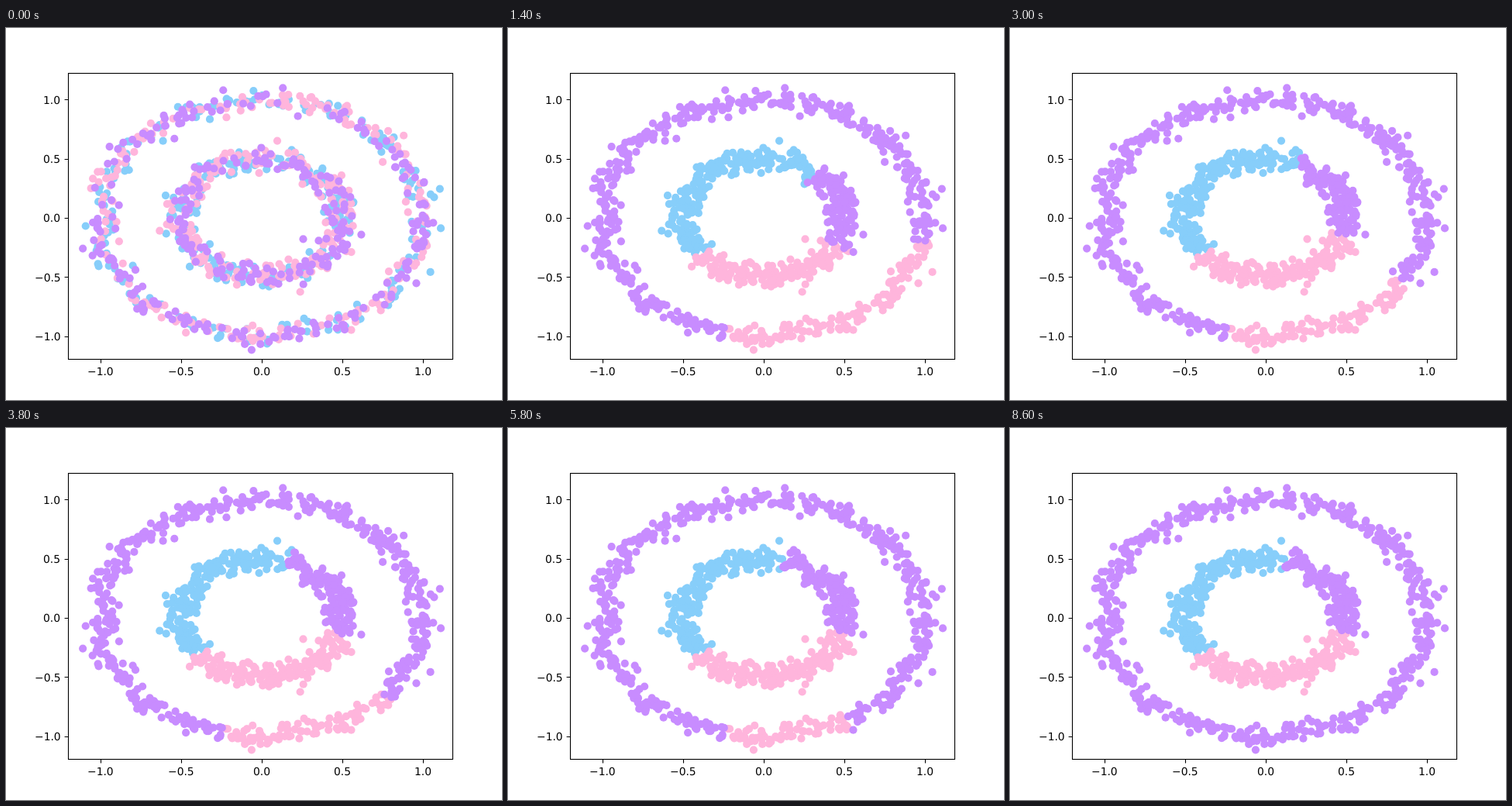
Write an HTML page with a canvas that moves like this. It is 640 px wide and 480 px high and loops after 8.8 s.

```html
<!DOCTYPE html>
<html lang="en">
<head>
<meta charset="utf-8">
<title>Clustering two rings</title>
<style>
html, body { margin: 0; width: 100%; height: 100%; overflow: hidden; background: #fff; }
canvas { display: block; }
</style>
</head>
<body>
<canvas id="plot" width="640" height="480"></canvas>
<script>
const ctx = document.getElementById('plot').getContext('2d');
const LOOP = 8800, STEP = 200;
const COLORS = ['#87cefa', '#ffb5dc', '#c88cff'];
const BLUE = 0, PINK = 1, PURPLE = 2;
const px = x => 330 + 208 * x;
const py = y => 245 - 152.7 * y;

let seed = 20;
function rand() {
  seed = (seed * 1664525 + 1013904223) % 4294967296;
  return seed / 4294967296;
}
function gauss() {
  return Math.sqrt(-2 * Math.log(1 - rand())) * Math.cos(2 * Math.PI * rand());
}

// Two noisy rings; each point starts in a random cluster
function ring(radius, count) {
  return Array.from({ length: count }, (_, i) => {
    const a = 2 * Math.PI * i / count;
    const x = radius * Math.cos(a) + 0.05 * gauss();
    const y = radius * Math.sin(a) + 0.05 * gauss();
    return { x: px(x), y: py(y), r: Math.hypot(x, y), inner: radius < 1,
      angle: Math.atan2(y, x) * 180 / Math.PI, first: Math.floor(rand() * 3) };
  });
}
const points = [...ring(1, 550), ...ring(0.5, 550)];

// Cluster borders in degrees, s seconds after the clusters have formed
function bordersAt(s) {
  const settle = (end, shift, time) => end + shift * Math.exp(-s / time);
  const collapse = Math.max(0, (s - 6.4) / 1.4);
  return {
    innerTop: settle(76, -48, 1.45),
    innerRight: settle(-14, -31, 1),
    innerLeft: settle(-143, 15, 0.3),
    outerRight: -14.5 * s + 0.58 * s * s - 28 * collapse ** 2,
    outerLeft: settle(-104, 6, 0.3),
    patch: Math.max(0, 1 - s / 0.6)
  };
}

function cluster(p, t, b) {
  if (t === 0) return p.first;
  const wobble = Math.max(0, 600 - t) / 16;
  const a = p.angle + wobble * Math.sin(p.angle * Math.PI / 30 + p.r * 4);
  if (p.inner) {
    if (a > b.innerLeft && a < b.innerRight) return PINK;
    return a >= b.innerRight && a < b.innerTop ? PURPLE : BLUE;
  }
  if (a > b.outerLeft && a < b.outerRight) return PINK;
  // Early patches that shrink away
  if (a < -180 + 28 * b.patch) return PINK;
  if (Math.abs(a - 44) < 6 * b.patch && p.r < 1.03) return BLUE;
  if (a > 48 && a < 48 + 34 * b.patch && p.r < 0.84 + 0.09 * b.patch) return BLUE;
  return PURPLE;
}

function drawAxes() {
  ctx.strokeStyle = ctx.fillStyle = '#000';
  ctx.lineWidth = 1.11;
  ctx.strokeRect(80.5, 58.5, 496, 369);
  ctx.font = '13.89px "DejaVu Sans", sans-serif';
  ctx.textRendering = 'geometricPrecision';
  ctx.beginPath();
  for (let v = -1; v <= 1; v += 0.5) {
    const x = Math.round(px(v)) + 0.5, y = Math.round(py(v)) + 0.5;
    const label = v.toFixed(1).replace('-', '\u2212');
    const width = ctx.measureText(label).width;
    ctx.moveTo(x, 427.5);
    ctx.lineTo(x, 432.4);
    ctx.moveTo(80.5, y);
    ctx.lineTo(75.6, y);
    ctx.fillText(label, Math.round(px(v) - width / 2), 448);
    ctx.fillText(label, Math.round(70.3 - width), Math.round(py(v) + 5.2));
  }
  ctx.stroke();
}

function draw(t) {
  const b = bordersAt(Math.max(0, t - 600) / 1000);
  const groups = [[], [], []];
  for (const p of points) groups[cluster(p, t, b)].push(p);
  ctx.fillStyle = '#fff';
  ctx.fillRect(0, 0, 640, 480);
  groups.forEach((group, i) => {
    ctx.fillStyle = COLORS[i];
    for (const p of group) {
      ctx.beginPath();
      ctx.arc(p.x, p.y, 5.1, 0, 2 * Math.PI);
      ctx.fill();
    }
  });
  drawAxes();
}

const start = performance.now();
let shown = 0;
function tick(now) {
  const t = Math.floor(Math.max(0, now - start) % LOOP / STEP) * STEP;
  if (t !== shown) draw(shown = t);
  requestAnimationFrame(tick);
}
draw(0);
requestAnimationFrame(tick);
</script>
</body>
</html>
```
